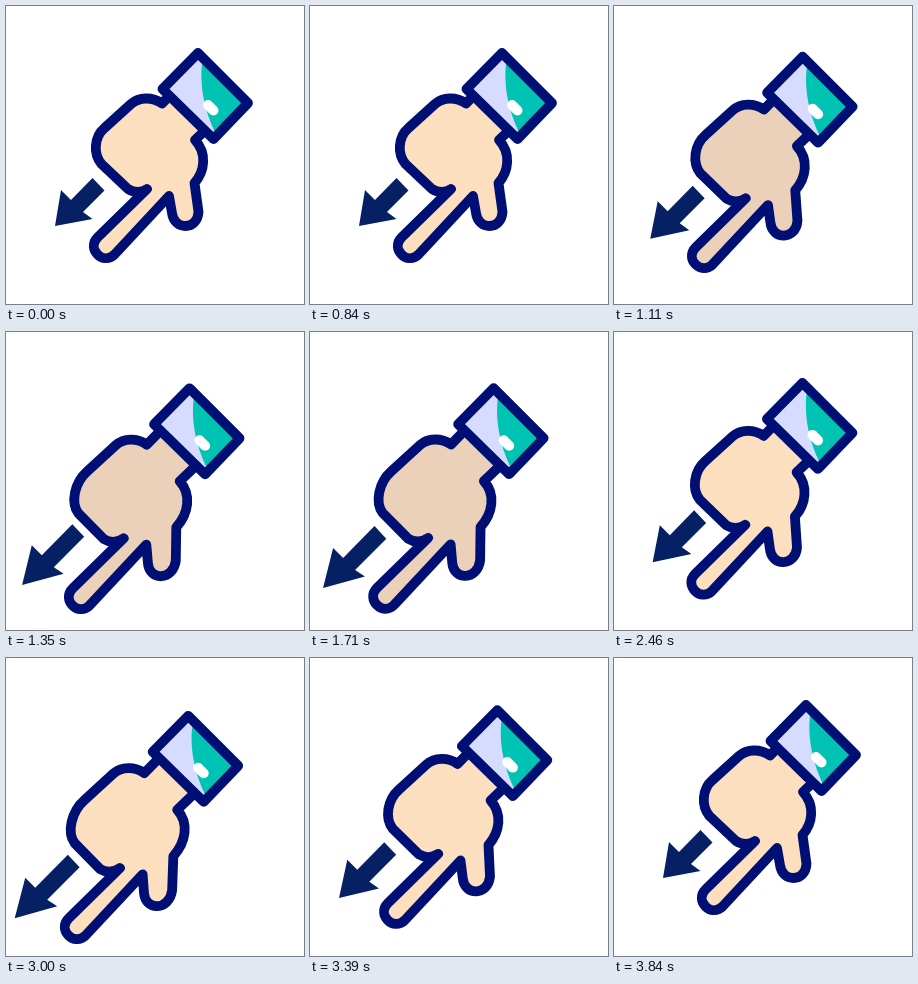
An HTML page for the animation above (4.92 s loop, 298x298 px).

```html
<!DOCTYPE html>
<html lang="en">
<head>
<meta charset="utf-8">
<title>Pointing hand</title>
<style>
  html, body { margin: 0; width: 100%; height: 100%; overflow: hidden; background: #fff; }
  svg { display: block; width: 100%; height: 100%; }
  .line { stroke: #000f74; stroke-width: 9.8; stroke-linejoin: round; stroke-linecap: round; }
</style>
</head>
<body>
<svg viewBox="0 0 298 298">
  <path id="arrow" fill="#052063" d="M49 220L55 184L65 194L86.5 172L98.5 184.5L77 206L86.5 213Z"/>
  <path id="hand" class="line" d="M176 77L156 97.5C146 90.5 133 91 125 98L98.5 122
    C88 131 87 148 95.5 158L122 183Q132 189 141 183L91.5 231.5
    C80.2 242.8 97.2 259.8 108.5 248.5L163 190L166 207
    C168 224.5 191.5 224.5 192.5 206L188.5 177C199 165 201 147 189 134L211 113"/>
  <g id="cuff">
    <path fill="#d6dcff" d="M156.5 83L192 47L242 97L207.5 133Z"/>
    <path fill="#00c3b3" d="M197 52C193 72 196 102 211 130L242 97Z"/>
    <path stroke="#fff" stroke-width="10" stroke-linecap="round" d="M202 99L207.5 104.5"/>
    <path class="line" fill="none" d="M156.5 83L192 47L242 97L207.5 133Z"/>
  </g>
</svg>
<script>
const LOOP = 4920, START = 840, END = 3840;
const [arrow, hand, cuff] = ['arrow', 'hand', 'cuff'].map(id => document.getElementById(id));
const arrowPath = arrow.getAttribute('d');
const handPath = hand.getAttribute('d');

// Reach down the diagonal at full swing: the tips travel further than the wrist or tail.
const handReach = (x, y) => 23.7 + 5.8 * Math.tanh((y - x - 10 + (x + y - 340) * 0.3) / 35);
const arrowReach = (x, y) => 44 - 19 * Math.exp((86 + x - y) / 50);

const warp = (path, reach, p) => path.replace(/([\d.]+) ([\d.]+)/g, (_, a, b) => {
  const x = +a, y = +b, d = reach(x, y) * p;
  return `${x - d} ${y + d}`;
});

// Two swings that meet at mid; the second one returns more slowly.
function swing(t, mid) {
  if (t < START || t > END) return 0;
  const u = t < mid ? (t - START) / (mid - START) : ((t - mid) / (END - mid)) ** 0.845;
  return Math.sin(Math.PI * u) ** 2;
}

function draw(t) {
  const p = swing(t, 2215);
  arrow.setAttribute('d', warp(arrowPath, arrowReach, swing(t, 2270)));
  hand.setAttribute('d', warp(handPath, handReach, p));
  hand.setAttribute('fill', t >= 1100 && t < 2235 ? '#ebd1b9' : '#fcdfbf');
  cuff.setAttribute('transform', `translate(${-10 * p} ${11 * p})`);
}

const start = performance.now();
function tick() {
  draw((performance.now() - start) % LOOP);
  requestAnimationFrame(tick);
}
tick();
</script>
</body>
</html>
```
